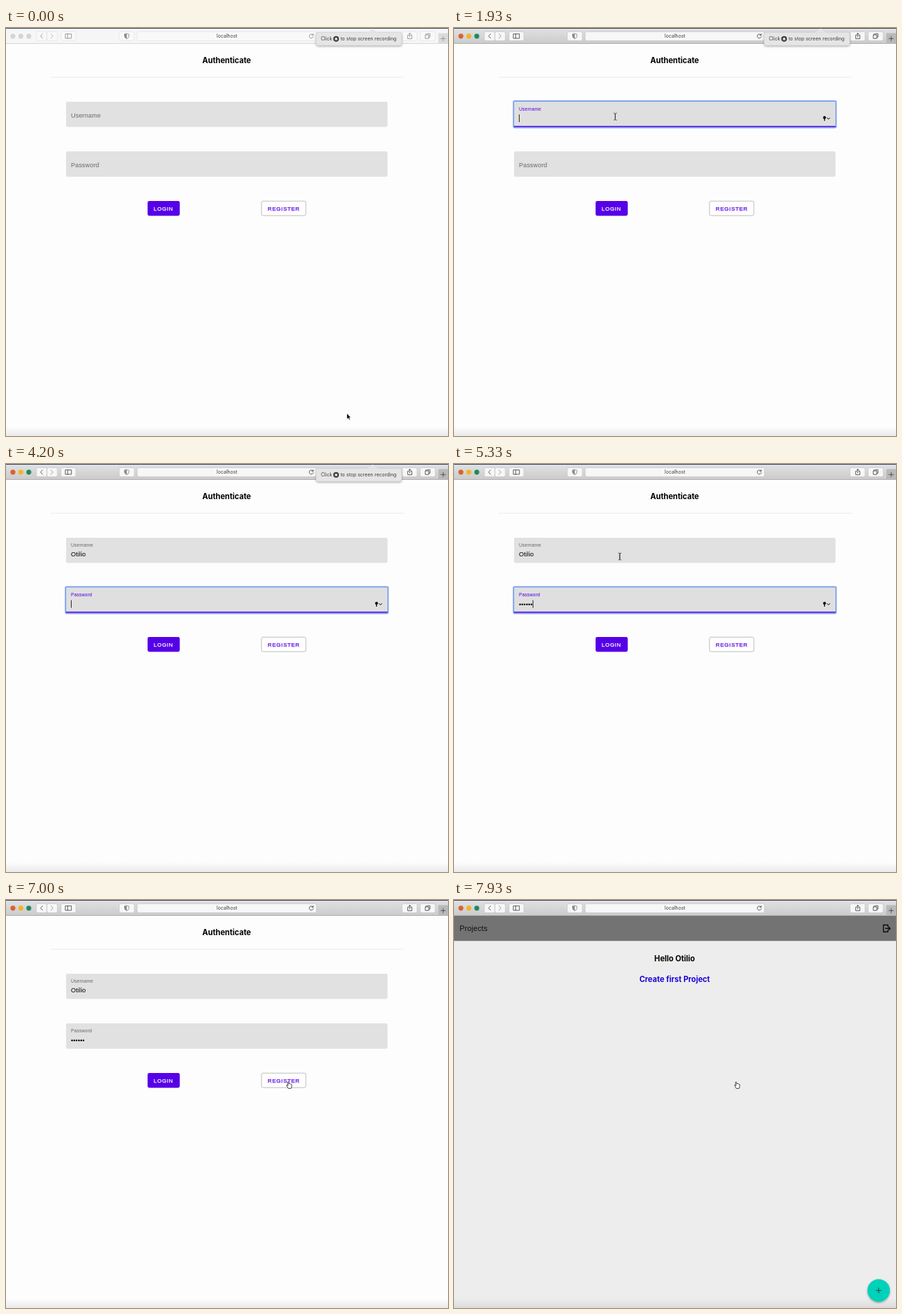
An HTML page that plays this animation: 640x592 px, repeating every 8000 ms.

```html
<!DOCTYPE html>
<html lang="en">
<head>
<meta charset="utf-8">
<title>Sign-in demo</title>
<style>
html, body { margin: 0; width: 100%; height: 100%; overflow: hidden; background: #fdfdfd; }
svg { display: block; width: 100%; height: 100%; }
text { font-family: "Liberation Sans", Arial, sans-serif; white-space: pre; }
.ui { font-family: Inter, "Open Sans", sans-serif; font-size: 7px; fill: #3c3c3c; }
.head { font-family: Inter, "Open Sans", sans-serif; font-size: 11.1px; font-weight: 700; text-anchor: middle; }
.mid { text-anchor: middle; }
.label, .value { font-size: 9.2px; letter-spacing: .01em; }
.btn { font-size: 8px; letter-spacing: .0892em; stroke-width: .25; }
.line { fill: none; stroke-linecap: round; stroke-linejoin: round; }
</style>
</head>
<body>
<svg viewBox="0 0 640 592" preserveAspectRatio="none">
  <defs>
    <linearGradient id="bar" x2="0" y2="1">
      <stop offset="0" stop-color="#e2e2e2"/><stop offset="1" stop-color="#cbcbcb"/>
    </linearGradient>
    <linearGradient id="foot" x2="0" y2="1">
      <stop offset="0" stop-color="#000" stop-opacity="0"/><stop offset="1" stop-color="#000" stop-opacity=".075"/>
    </linearGradient>
    <filter id="soft" x="-20%" y="-60%" width="140%" height="240%">
      <feDropShadow dx="0" dy="1.2" stdDeviation="1.6" flood-color="#000" flood-opacity=".35"/>
    </filter>
  </defs>

  <rect width="640" height="592" fill="#fdfdfd"/>

  <g id="login">
    <text class="head" x="319.5" y="51">Authenticate</text>
    <path d="M64 71.3H576" stroke="#ebebeb"/>
    <g id="fields"></g>
    <rect x="205" y="251" width="46.6" height="21.4" rx="2.4" fill="#5600e8"/>
    <text class="btn" x="213.8" y="264.5" fill="#fff" stroke="#fff">LOGIN</text>
    <rect x="369.9" y="251.2" width="64.3" height="21" rx="2.2" fill="#fefefe" stroke="#bdbdbd"/>
    <text class="btn" x="379" y="264.7" fill="#5600e8" stroke="#5600e8">REGISTER</text>
  </g>

  <g id="projects">
    <rect y="22" width="640" height="570" fill="#ededed"/>
    <rect y="22" width="640" height="37.4" fill="#737373"/>
    <text x="8" y="45.2" font-size="11" letter-spacing=".1" fill="#111">Projects</text>
    <path class="line" stroke="#0c0c0c" stroke-width="1.4" d="M628.3 38.5V36.3H621.8V46.3H628.3V44.1M625 41.3H631.4M629.3 39L631.6 41.3L629.3 43.6"/>
    <text class="head" x="319.5" y="88.5">Hello Otilio</text>
    <text class="head" x="319.5" y="119.2" fill="#1a06d6">Create first Project</text>
    <circle cx="614.9" cy="566.6" r="16.3" fill="#03d1b9" filter="url(#soft)"/>
    <path d="M610.9 566.6H618.9M614.9 562.6V570.6" stroke="#1d4a45"/>
  </g>

  <rect y="578" width="640" height="14" fill="url(#foot)"/>

  <g id="chrome">
    <rect id="idle" width="640" height="22.5" fill="#f6f6f6"/>
    <rect id="active" width="640" height="22.5" fill="url(#bar)"/>
    <path id="edge" d="M0 22.5H640"/>
    <rect width="640" height="1" fill="#34465a"/>
    <g id="lights"><circle cx="10" cy="11.8" r="3.6"/><circle cx="21.5" cy="11.8" r="3.6"/><circle cx="33" cy="11.8" r="3.6"/></g>
    <g id="buttons"></g>
    <rect id="newTab" x="626" y="7.5" width="14" height="15"/>
    <g id="icons" class="line" stroke-width=".9">
      <path d="M53 8.6L50 11.8L53 15"/>
      <path id="forward" d="M65 8.6L68 11.8L65 15"/>
      <path d="M86.3 8.6H94.7V15H86.3ZM89.3 8.6V15"/>
      <path d="M174.8 8.2L178 9.2V12Q177.6 14.4 174.8 15.7Q172 14.4 171.6 12V9.2Z" stroke="#8a8a8a"/>
      <path d="M174.8 8.2V15.7Q172 14.4 171.6 12V9.2Z" fill="#8a8a8a" stroke="none"/>
      <path d="M444.6 10.2A3 3 0 1 0 445 12.4M444.9 8.4V10.4H442.9"/>
      <path d="M583 10.5H581.7V15.6H587.7V10.5H586.4M584.7 13V7.6M582.9 9.2L584.7 7.4L586.5 9.2"/>
      <path d="M607.6 8.9H610.3V8.3H614V13.2H612.2M607.5 10H612.2V15.2H607.5Z"/>
      <path d="M629.7 15.4H636.3M633 12.1V18.7"/>
    </g>
    <text class="ui mid" x="320" y="14.4">localhost</text>
  </g>

  <g id="bubble">
    <rect x="449" y="6.2" width="124" height="19" rx="3.2" fill="#e5e5e5" stroke="#c4c4c4" stroke-width=".5" filter="url(#soft)"/>
    <path d="M520 6.6Q527 5.6 529.4 1.4Q530.8 -.4 532.2 1.4Q534.6 5.6 542 6.6Z" fill="#e5e5e5"/>
    <text class="ui" x="456" y="18.3">Click</text>
    <circle cx="478" cy="15.8" r="4.1" fill="#3d3d3d"/>
    <rect x="476.4" y="14.2" width="3.2" height="3.2" rx=".5" fill="#eee"/>
    <text class="ui" x="484.4" y="18.3">to stop screen recording</text>
  </g>

  <g id="pointer">
    <path id="arrow" d="M0 0V8.7L2 6.9L3.4 10.1L4.9 9.5L3.5 6.4H6.1Z" fill="#000" stroke="#fff" stroke-width=".7"/>
    <path id="beam" class="line" stroke="#222" stroke-width=".8" d="M-1.8 -5Q0 -5 0 -4V4Q0 5 -1.8 5M1.8 -5Q0 -5 0 -4V4Q0 5 1.8 5"/>
    <path id="hand" class="line" style="fill:#fff" stroke="#111" stroke-width=".8" d="M-1.6 5L-3.6 1.2Q-4 .2 -2.9 .3L-1.7 1.4L-2.4 -3.3Q-2.2 -4.7 -1.1 -3.6L-.5 -1.2Q.4 -2 1.1 -1.1Q2 -1.7 2.5 -.7Q3.7 -1 3.8 .3Q4.1 2.6 3 5Z"/>
  </g>
</svg>

<script>
const LOOP = 8000, PURPLE = '#5600e8', NAME = 'Otilio';
const $ = id => document.getElementById(id);
const clamp = v => Math.max(0, Math.min(1, v));
const ease = v => v * v * (3 - 2 * v);
const mix = (a, b, p) => a + (b - a) * p;
const show = (el, on) => el.setAttribute('display', on ? 'inline' : 'none');

function add(parent, tag, attrs, text = '') {
  const el = document.createElementNS('http://www.w3.org/2000/svg', tag);
  for (const k in attrs) el.setAttribute(k, attrs[k]);
  el.textContent = text;
  parent.append(el);
  return el;
}

// Toolbar buttons: x, width
[[44, 15], [59.3, 15], [79.6, 21.6], [164, 21.8], [190, 259.5], [573.5, 21.7], [599.8, 21.7]].forEach(([x, width]) =>
  add($('buttons'), 'rect', { x, y: 5.4, width, height: 13, rx: 2.2, 'stroke-width': .6 }));

function makeField(y, name) {
  const g = add($('fields'), 'g', { transform: `translate(0 ${y})` });
  const box = add(g, 'rect', { x: 87, y: 0, width: 465.4, height: 36.7, rx: 1.8 });
  const focus = add(g, 'g', {});
  add(focus, 'rect', { x: 86.2, y: -.8, width: 467, height: 38.4, rx: 1.4, fill: 'none', stroke: '#7fa4ef', 'stroke-width': 2 });
  add(focus, 'circle', { cx: 536.5, cy: 23, r: 2.1 });
  add(focus, 'path', { d: 'M536.5 24V27.8', stroke: '#000', 'stroke-width': 1.3 });
  add(focus, 'path', { class: 'line', d: 'M540.2 23.4L542.2 25.4L544.2 23.4', stroke: '#000' });
  const line = add(g, 'rect', { y: 35.2, height: 1.5, fill: PURPLE });
  const label = add(g, 'text', { class: 'label' }, name);
  const value = add(g, 'text', { class: 'value', x: 94, y: 27.6 });
  const caret = add(g, 'rect', { y: 18.6, width: .9, height: 11, fill: '#111' });

  return ({ t, start, end, from, text, blink }) => {
    const on = t >= start && t < end;
    const p = ease(clamp((t - start) / 150));
    const spread = ease(clamp((t - start) / 180));
    const x0 = mix(from, 87, spread), x1 = mix(from, 552.4, spread);
    box.setAttribute('fill', on ? '#dfdfdf' : '#e1e1e1');
    show(focus, on);
    show(line, on);
    line.setAttribute('x', x0);
    line.setAttribute('width', x1 - x0);
    label.setAttribute('transform', `translate(94 ${mix(23.2, 12.8, p)}) scale(${mix(1, .75, p)})`);
    label.setAttribute('fill', on ? PURPLE : '#6a6a6a');
    value.textContent = text;
    show(caret, on && !blink);
    caret.setAttribute('x', 94 + (text ? value.getComputedTextLength() : 0));
  };
}
const username = makeField(106.9, 'Username');
const password = makeField(179.1, 'Password');

const nameKeys = [3000, 3070, 3270, 3400, 3470, 3600];
const passKeys = [4470, 4600, 4730, 4870, 5000, 5130];
const typed = (t, keys) => keys.filter(k => t >= k).length;

// Pointer moves: start, end, pictures, target x, target y
const moves = [
  [70, 330, 4, 461, 327],
  [530, 670, 3, 332, 186],
  [870, 1000, 3, 222, 118],
  [1400, 2130, 11, 236, 131],
  [5270, 6000, 11, 410, 268]
];

function pointerAt(t) {
  let x = 493.5, y = 559;
  for (const [a, b, n, tx, ty] of moves) {
    if (t < a) break;
    const step = Math.min(n, Math.floor((t - a) / (b - a) * (n - 1) + 1e-6) + 1);
    const p = ease(step / n);
    x = mix(x, tx, p);
    y = mix(y, ty, p);
  }
  return [x, y];
}

function drawChrome(on) {
  show($('active'), on);
  $('edge').setAttribute('stroke', on ? '#adadad' : '#d6d6d6');
  const colors = on ? ['#db6030', '#f3b32d', '#1f8a60'] : Array(3).fill('#d4d4d4');
  [...$('lights').children].forEach((c, i) => c.setAttribute('fill', colors[i]));
  $('buttons').setAttribute('fill', on ? '#f7f7f7' : '#f9f9f9');
  $('buttons').setAttribute('stroke', on ? '#c0c0c0' : '#dedede');
  $('newTab').setAttribute('fill', on ? '#b9b9b9' : '#dcdcdc');
  $('icons').setAttribute('stroke', on ? '#4a4a4a' : '#8f8f8f');
  $('forward').setAttribute('stroke', on ? '#909090' : '#b4b4b4');
}

function drawPointer(t) {
  const [x, y] = pointerAt(t);
  const inField = x > 87 && x < 552 && ((y > 107 && y < 144) || (y > 179 && y < 216));
  const onButton = x > 369 && y > 251 && y < 273;
  const kind = t < 1400 ? 'arrow' : onButton ? 'hand' : inField ? 'beam' : 'arrow';
  for (const id of ['arrow', 'beam', 'hand']) show($(id), id === kind);
  $('pointer').setAttribute('transform', `translate(${x} ${y})`);
  show($('pointer'), t < 2930 || t >= 5270);
}

function draw(t) {
  const done = t >= 7070;
  show($('login'), !done);
  show($('projects'), done);
  drawChrome(t >= 1200);
  username({
    t, start: 1400, end: 3930, from: 222,
    text: NAME.slice(0, typed(t, nameKeys)),
    blink: t >= 2130 && t < 2670
  });
  password({
    t, start: 3930, end: 6670, from: 320,
    text: '•'.repeat(typed(t, passKeys)),
    blink: t >= 6130 && t < 6400
  });
  const fade = 1 - clamp((t - 4870) / 260);
  $('bubble').setAttribute('opacity', fade);
  show($('bubble'), fade > 0);
  drawPointer(t);
}

const began = performance.now();
function tick() {
  draw((performance.now() - began) % LOOP);
  requestAnimationFrame(tick);
}
tick();
</script>
</body>
</html>
```
